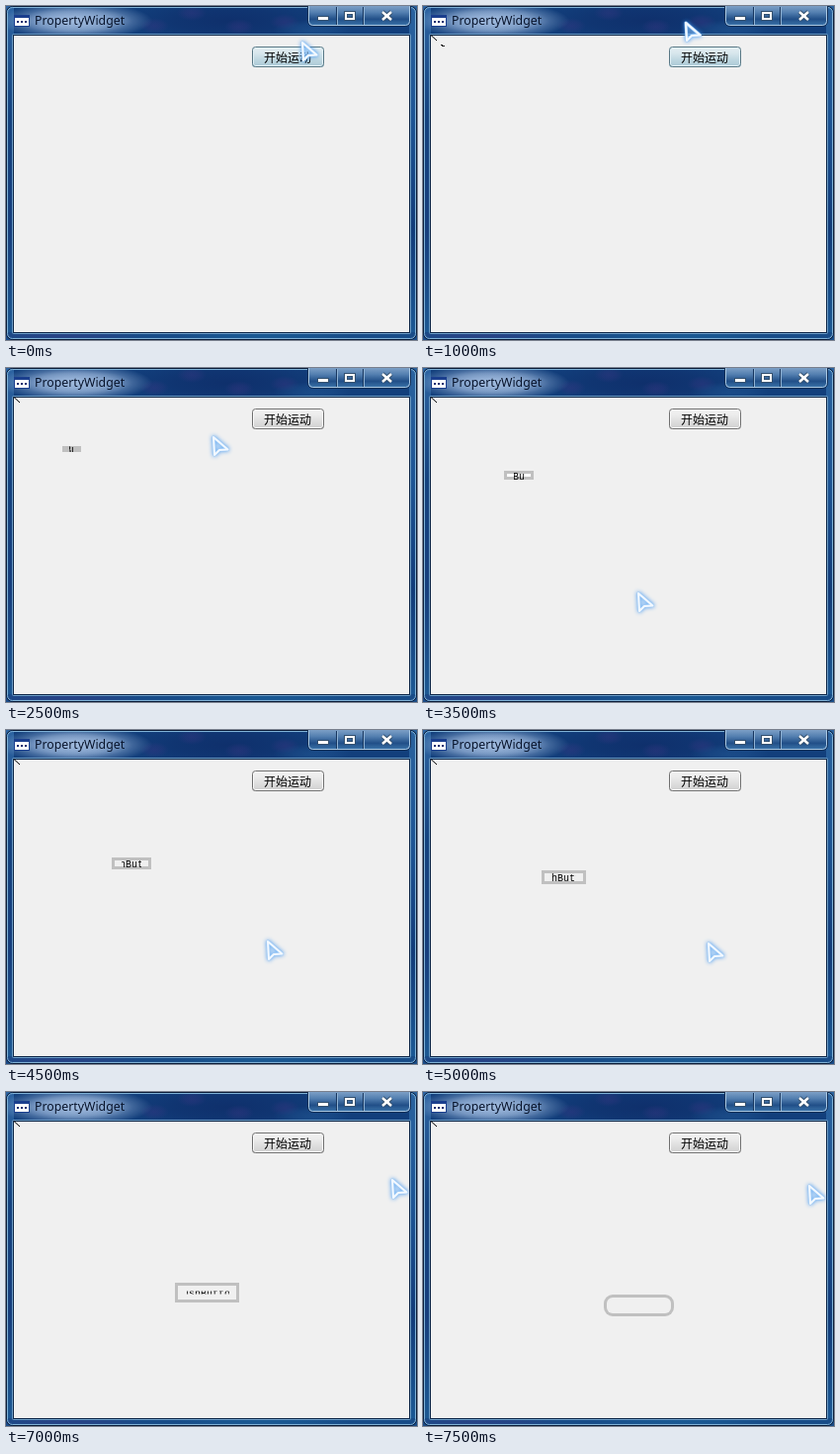
Recreate the animation shown at these times as an HTML page with a canvas. Size 416x338 px, loop 8000 ms.

```html
<!DOCTYPE html>
<html lang="zh">
<head>
<meta charset="utf-8">
<style>
html, body { margin: 0; width: 100%; height: 100%; overflow: hidden; background: #123a72; }
canvas { display: block; }
</style>
</head>
<body>
<canvas id="stage" width="416" height="338"></canvas>
<script>
const ctx = document.getElementById('stage').getContext('2d');
const STEP = 500, STEPS = 16, START = 2;

// Pointer position for every step
const pointer = [
  [297, 35], [284, 47], [263, 15], [393, 6], [388, 10], [207, 68], [207, 101], [215, 226],
  [262, 270], [262, 212], [286, 214], [296, 196], [387, 92], [388, 87], [388, 87], [388, 93]
];

function fill(x, y, w, h, color) {
  ctx.fillStyle = color;
  ctx.fillRect(x, y, w, h);
}

function round(x, y, w, h, r) {
  ctx.beginPath();
  ctx.roundRect(x, y, w, h, r);
}

function outline(x, y, w, h, r, color) {
  round(x + .5, y + .5, w - 1, h - 1, r);
  ctx.lineWidth = 1;
  ctx.strokeStyle = color;
  ctx.stroke();
}

function vertical(y0, y1, ...colors) {
  const g = ctx.createLinearGradient(0, y0, 0, y1);
  colors.forEach((c, i) => g.addColorStop(i / (colors.length - 1), c));
  return g;
}

function blob(x, y, rx, ry, rgb, alpha) {
  ctx.save();
  ctx.translate(x, y);
  ctx.scale(rx, ry);
  const g = ctx.createRadialGradient(0, 0, 0, 0, 0, 1);
  g.addColorStop(0, `rgba(${rgb},${alpha})`);
  g.addColorStop(.5, `rgba(${rgb},${alpha * .65})`);
  g.addColorStop(1, `rgba(${rgb},0)`);
  ctx.fillStyle = g;
  ctx.fillRect(-1, -1, 2, 2);
  ctx.restore();
}

function text(str, x, y, font, color = '#000') {
  ctx.font = font;
  ctx.fillStyle = color;
  ctx.fillText(str, x, y);
}

function line(points, color, width = 1) {
  ctx.beginPath();
  points.forEach(p => ctx.lineTo(...p));
  ctx.strokeStyle = color;
  ctx.lineWidth = width;
  ctx.stroke();
}

function drawFrame() {
  fill(0, 0, 416, 338, '#123f7c');
  fill(0, 0, 8, 338, vertical(0, 338, '#2d64a2', '#14437f', '#173f7d', '#1d5a94'));
  fill(408, 0, 8, 338, vertical(0, 338, '#2a629e', '#1d5595', '#123c79', '#1c5a96'));
  fill(0, 330, 416, 8, '#184c88');
  blob(60, 334, 80, 6, '70,50,130', .35);
  blob(260, 334, 90, 6, '30,110,165', .4);

  ctx.save();
  ctx.beginPath();
  ctx.rect(0, 0, 416, 30);
  ctx.clip();
  blob(225, 15, 110, 24, '14,44,104', .8);
  for (const x of [150, 188, 236, 282]) blob(x, 6 + x % 17, 15, 8, '65,55,135', .35);
  blob(310, 24, 40, 10, '35,90,150', .5);
  blob(70, 15, 78, 19, '165,192,226', .95);
  blob(70, 15, 58, 13, '165,190,225', .5);
  ctx.restore();

  outline(0, 0, 416, 338, 6, '#0c1f3c');
  outline(1, 1, 414, 336, 5, '#7fb2d8');
  outline(6, 28, 404, 304, 1, '#6f9fc8');
  outline(7, 29, 402, 302, 0, '#0e2748');
  fill(8, 30, 400, 300, '#f0f0f0');

  // Window icon and title
  fill(8, 9, 16, 12, '#1b3f8e');
  fill(9, 12, 14, 8, '#fff');
  for (const x of [11, 15, 19]) fill(x, 15, 2, 2, '#142a70');
  text('PropertyWidget', 29, 19, '12.3px "Noto Sans", "Open Sans", sans-serif', '#08142c');
}

function drawControls(glow) {
  if (glow) blob(386, 10, 40, 24, '255,95,60', glow * .8);
  round(306, -4, 103, 24, 5);
  ctx.fillStyle = vertical(0, 20, '#7c9fc6', '#527eaf', '#214f88', '#3d76ab');
  ctx.fill();
  if (glow) {
    round(362, -4, 46, 23, [0, 0, 4, 0]);
    ctx.globalAlpha = glow;
    ctx.fillStyle = vertical(0, 20, '#eaa698', '#d0553c', '#bb2a10', '#f08a44');
    ctx.fill();
    ctx.globalAlpha = 1;
  }
  outline(305, -5, 105, 26, 5, '#132f57');
  outline(306, -4, 103, 24, 4, '#a9c8e3');
  for (const x of [334, 361]) {
    fill(x, 1, 1, 18, '#17365f');
    fill(x + 1, 1, 1, 18, '#8fb2d4');
  }
  fill(315, 10, 12, 5, '#33506f');
  fill(316, 11, 10, 3, '#fff');
  ctx.lineWidth = 4;
  ctx.strokeStyle = '#33506f';
  ctx.strokeRect(344, 7, 8, 6);
  ctx.lineWidth = 2;
  ctx.strokeStyle = '#fff';
  ctx.strokeRect(344, 7, 8, 6);
  for (const [color, width] of [['#33506f', 4.5], ['#fff', 2.4]]) {
    line([[381, 6], [390, 14]], color, width);
    line([[390, 6], [381, 14]], color, width);
  }
}

function drawStartButton(hot) {
  round(249, 41, 73, 21, 3);
  ctx.fillStyle = hot
    ? vertical(41, 62, '#e6eff3', '#d7e6ec', '#bcd5df', '#aac8d5')
    : vertical(41, 62, '#f4f4f4', '#ebebeb', '#dcdcdc', '#cfcfcf');
  ctx.fill();
  outline(250, 42, 71, 19, 2, hot ? '#e2f1f6' : '#fafafa');
  outline(249, 41, 73, 21, 3, hot ? '#587784' : '#707070');
  text('开始运动', 261, 57, '12px "Noto Sans CJK SC", "Noto Sans CJK", sans-serif');
}

function drawMover(k) {
  const x = Math.floor(18.95 + 12.69 * k), y = x + 22;
  const w = Math.floor(4.36 + 5.13 * k), h = Math.floor(1.6 + 1.57 * k);
  line([[8, 29.5], [14, 35]], '#000');
  if (k === 0) {
    fill(x, y - 1, 2, 1, '#222');
    fill(x + 1, y, 3, 1, '#222');
    return;
  }
  const r = h >= 21 ? 9 : 0;
  round(x, y, w, h, r);
  ctx.fillStyle = '#c0c0c0';
  ctx.fill();
  if (h > 6) {
    round(x + 3, y + 3, w - 6, h - 6, Math.max(0, r - 3));
    ctx.fillStyle = h < 11 ? '#fff' : '#f0f0f0';
    ctx.fill();
  }
  // The label is cropped to the content box
  const cw = Math.max(5, w - 20), inset = Math.max(0, h - 14) * 1.4;
  if (h <= inset * 2) return;
  ctx.save();
  ctx.beginPath();
  ctx.rect(x + (w - cw) / 2, y + inset, cw, h - inset * 2);
  ctx.clip();
  text('PushButton', Math.floor(x + w / 2) - 30, Math.floor(y + h / 2 + 4.5),
    '10px "Liberation Mono", monospace');
  ctx.restore();
}

function drawPointer([x, y]) {
  ctx.save();
  ctx.translate(x, y);
  ctx.beginPath();
  for (const p of [[3, 2], [4, 20], [9, 15], [17.5, 14.5]]) ctx.lineTo(...p);
  ctx.closePath();
  ctx.lineJoin = 'round';
  ctx.shadowColor = '#3f94ee';
  ctx.shadowBlur = 4;
  ctx.lineWidth = 3;
  ctx.strokeStyle = '#a5cdf6';
  ctx.stroke();
  ctx.shadowBlur = 0;
  ctx.fillStyle = 'rgba(155,203,250,.4)';
  ctx.fill();
  ctx.lineWidth = 2;
  ctx.strokeStyle = '#f3f9ff';
  ctx.stroke();
  ctx.restore();
}

function draw(now) {
  const n = Math.floor(now / STEP) % STEPS;
  drawFrame();
  drawControls(n === 3 ? .6 : n === 4 ? .9 : 0);
  drawStartButton(n < 3);
  if (n >= START) drawMover(n - START);
  drawPointer(pointer[n]);
  requestAnimationFrame(draw);
}

const begin = performance.now();
(function loop() {
  const base = begin;
  const tick = draw;
  requestAnimationFrame(t => tick(Math.max(0, t - base)));
})();
</script>
</body>
</html>
```
